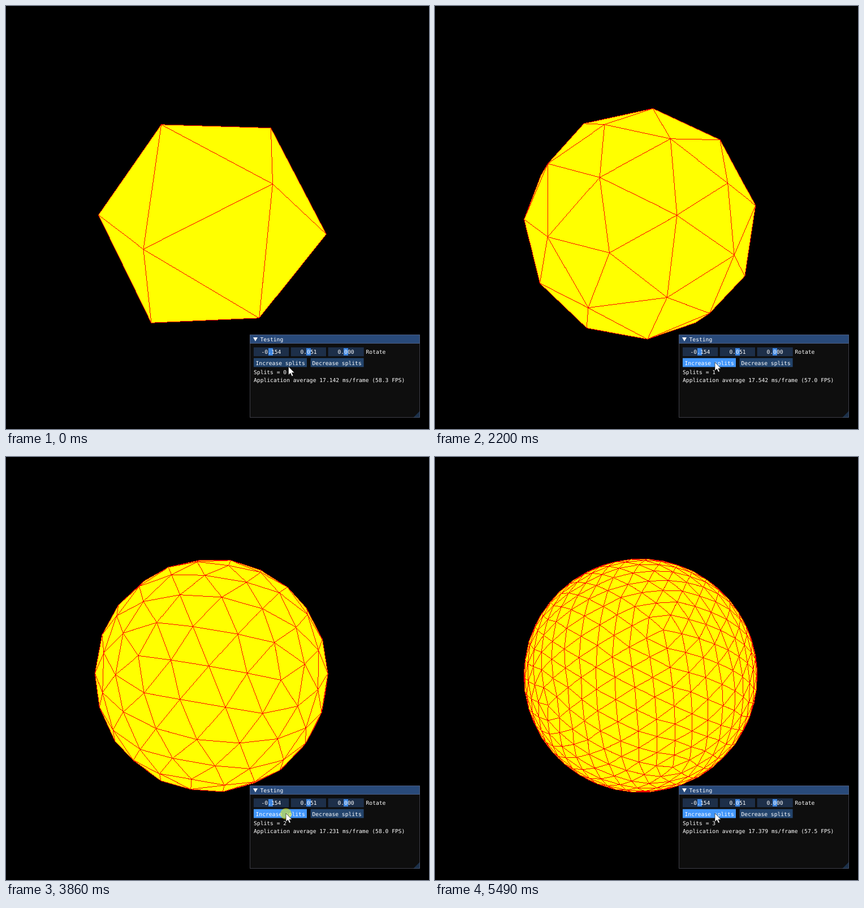
These frames come from a looping animation (748 px wide and 748 px high, 5.51 s). An HTML page with a canvas:

```html
<!DOCTYPE html>
<html lang="en">
<head>
<meta charset="utf-8">
<title>Icosphere splits</title>
<style>
  html, body { margin: 0; width: 100%; height: 100%; overflow: hidden; background: #000; }
  canvas, svg { position: absolute; left: 0; top: 0; width: 748px; height: 748px; display: block; }
  text {
    font: 9.67px "DejaVu Sans Mono", "Liberation Mono", monospace;
    fill: #fff; white-space: pre; text-rendering: geometricPrecision;
  }
  .edge { fill: none; stroke: #6e6e80; stroke-opacity: .5; }
  .frame { fill: #1d2f49; }
  .grab { fill: #3d85e0; }
  .button { fill: #23446c; }
  .button.hover { fill: #4296fa; }
  .mid { text-anchor: middle; }
</style>
</head>
<body>
<canvas id="stage" width="748" height="748"></canvas>
<svg viewBox="0 0 748 748">
  <rect x="431" y="581" width="301" height="147" fill="#0e0e0e"/>
  <rect x="431" y="581" width="301" height="16" fill="#294a7a"/>
  <path d="M732 716V728H720Z" fill="#1b304a"/>
  <path class="edge" d="M431.5 581.5H731.5V727.5H431.5ZM432 596.5H731"/>
  <path d="M437 586H445L441 593Z" fill="#fff"/>
  <text x="449.5" y="593">Testing</text>

  <rect class="frame" x="438" y="603.6" width="62.3" height="15.8"/>
  <rect class="frame" x="503.7" y="603.6" width="62.3" height="15.8"/>
  <rect class="frame" x="569.6" y="603.6" width="63.2" height="15.8"/>
  <rect class="grab" x="464" y="605" width="8" height="13"/>
  <rect class="grab" x="531" y="605" width="8" height="13"/>
  <rect class="grab" x="597" y="605" width="8" height="13"/>
  <text class="mid" x="469" y="615">-0.154</text>
  <text class="mid" x="535" y="615">0.051</text>
  <text class="mid" x="601" y="615">0.000</text>
  <text x="636.5" y="615">Rotate</text>

  <rect id="more" class="button" x="438" y="622.6" width="94" height="15.8"/>
  <rect class="button" x="538.6" y="622.6" width="94" height="15.8"/>
  <text x="441.5" y="634.5">Increase splits</text>
  <text x="541.5" y="634.5">Decrease splits</text>
  <text id="splits" x="438" y="651">Splits = 0</text>
  <text id="rate" x="438" y="665"></text>

  <circle id="click" cx="495" cy="631" r="10" fill="#ff0" fill-opacity=".5"/>
  <path id="cursor" d="M0 0V15L3.5 11.8L6 17.2L8.4 16.2L6 11H10.6Z"
        fill="#fff" stroke="#000" stroke-width=".6"/>
</svg>
<script>
const LOOP = 5510;
const CENTER_X = 363, CENTER_Y = 386, EYE = 5, FOCAL = 1011.6;
const RAD = Math.PI / 180;
const BOX = { x: 150, y: 170, size: 430 };
const RED = 0xff0000ff;

// Repaint bursts: first time, last time, number of repaints
const BURSTS = [
  [30, 570, 19], [600, 780, 8], [880, 1150, 11], [1180, 1640, 20], [1670, 1720, 2],
  [1740, 2240, 17], [2340, 2700, 16], [2720, 2870, 6], [2900, 3440, 19], [3470, 3860, 11],
  [3890, 4000, 4], [4030, 4490, 20], [4520, 4570, 2], [4590, 5130, 19], [5160, 5490, 11]
];
// Repaint count, turn in degrees, average ms per repaint
const KEYS = [
  [0, 0, 17.142], [27, 37.25, 17.282], [58, 80.25, 17.7], [93, 128.3, 17.375],
  [129, 179.4, 17.231], [153, 213.9, 17.564], [185, 256.5, 17.379]
];
const SPLIT_TIMES = [1100, 2520, 3950];

const $ = id => document.getElementById(id);
const ctx = $('stage').getContext('2d', { willReadFrequently: true });
const dot = (a, b) => a[0] * b[0] + a[1] * b[1] + a[2] * b[2];
const cross = (a, b) => [
  a[1] * b[2] - a[2] * b[1], a[2] * b[0] - a[0] * b[2], a[0] * b[1] - a[1] * b[0]
];
const mix = (a, s, b, t) => a.map((v, i) => v * s + b[i] * t);
const unit = a => a.map(v => v / Math.hypot(...a));

// Point on the unit sphere, height along the spin axis and azimuth around it
function onSphere(height, azimuth) {
  const r = Math.sqrt(1 - height * height), a = azimuth * RAD;
  return [r * Math.sin(a), height, r * Math.cos(a)];
}

function icosahedron() {
  const pole = onSphere(0.1668, 29.3), near = onSphere(-0.164, -31.6);
  const u = unit(mix(near, 1, pole, -dot(near, pole))), v = cross(pole, u);
  const half = [pole];
  for (let k = 0; k < 5; k++) {
    const a = k * 72 * RAD;
    half.push(unit(mix(pole, 0.5, mix(u, Math.cos(a), v, Math.sin(a)), 1)));
  }
  const points = half.concat(half.map(p => p.map(c => -c)));
  const linked = (i, j) => dot(points[i], points[j]) > 0.4;
  const faces = [];
  for (let a = 0; a < 12; a++)
    for (let b = a + 1; b < 12; b++)
      for (let c = b + 1; c < 12; c++)
        if (linked(a, b) && linked(b, c) && linked(a, c)) {
          const outward = dot(cross(points[a], points[b]), points[c]) > 0;
          faces.push(outward ? [a, b, c] : [a, c, b]);
        }
  return { points, faces };
}

function split(mesh) {
  const points = mesh.points.slice(), known = new Map();
  const middle = (a, b) => {
    const key = Math.min(a, b) * 1000 + Math.max(a, b);
    if (!known.has(key)) known.set(key, points.push(unit(mix(points[a], 1, points[b], 1))) - 1);
    return known.get(key);
  };
  const faces = mesh.faces.flatMap(([a, b, c]) => {
    const ab = middle(a, b), bc = middle(b, c), ca = middle(c, a);
    return [[a, ab, ca], [ab, b, bc], [ca, bc, c], [ab, bc, ca]];
  });
  return { points, faces };
}

const meshes = [icosahedron()];
for (let i = 0; i < 3; i++) meshes.push(split(meshes[i]));

// Spin about the axis, tilt the axis, then project
function projector(turn) {
  const cs = Math.cos(turn), sn = Math.sin(turn);
  const cp = Math.cos(4.02 * RAD), sp = Math.sin(4.02 * RAD);
  const cr = Math.cos(8.48 * RAD), sr = Math.sin(8.48 * RAD);
  return ([x, y, z]) => {
    const x1 = x * cs - z * sn, z1 = x * sn + z * cs;
    const y2 = y * cp + z1 * sp, z2 = z1 * cp - y * sp;
    const scale = FOCAL / (EYE - z2);
    return [CENTER_X + (x1 * cr - y2 * sr) * scale, CENTER_Y - (x1 * sr + y2 * cr) * scale];
  };
}

// Hard-edged line, one pixel wide
function plot(pixels, a, b) {
  const dx = b[0] - a[0], dy = b[1] - a[1];
  const n = Math.max(1, Math.ceil(Math.max(Math.abs(dx), Math.abs(dy))));
  for (let i = 0; i <= n; i++) {
    const x = Math.round(a[0] + dx * i / n) - BOX.x;
    const y = Math.round(a[1] + dy * i / n) - BOX.y;
    pixels[y * BOX.size + x] = RED;
  }
}

function drawMesh(mesh, turn) {
  const flat = mesh.points.map(projector(turn));
  const front = mesh.faces.filter(([i, j, k]) => {
    const a = flat[i], b = flat[j], c = flat[k];
    return (b[0] - a[0]) * (c[1] - a[1]) - (b[1] - a[1]) * (c[0] - a[0]) < 0;
  });
  ctx.fillStyle = '#000';
  ctx.fillRect(0, 0, 748, 748);
  ctx.fillStyle = '#ff0';
  ctx.beginPath();
  for (const face of front) {
    face.forEach((p, i) => ctx[i ? 'lineTo' : 'moveTo'](flat[p][0] + 0.5, flat[p][1] + 0.5));
    ctx.closePath();
  }
  ctx.fill();

  const image = ctx.getImageData(BOX.x, BOX.y, BOX.size, BOX.size);
  const pixels = new Uint32Array(image.data.buffer);
  for (const face of front)
    face.forEach((p, i) => {
      const q = face[(i + 1) % 3];
      plot(pixels, flat[Math.min(p, q)], flat[Math.max(p, q)]);
    });
  ctx.putImageData(image, BOX.x, BOX.y);
}

function repaintsAt(t) {
  let count = 0;
  for (const [from, to, n] of BURSTS) {
    if (t >= to) count += n;
    else if (t >= from) count += 1 + Math.floor((t - from) * (n - 1) / (to - from));
  }
  return count;
}

function keyed(step, column) {
  const i = Math.max(1, KEYS.findIndex(k => k[0] >= step));
  const a = KEYS[i - 1], b = KEYS[i];
  return a[column] + (b[column] - a[column]) * (step - a[0]) / (b[0] - a[0]);
}

let painted = '';
function draw(t) {
  const step = repaintsAt(t);
  const splits = SPLIT_TIMES.filter(s => t >= s).length;
  if (painted !== step + ':' + splits) {
    painted = step + ':' + splits;
    drawMesh(meshes[splits], keyed(step, 1) * RAD);
    const ms = keyed(step, 2);
    $('splits').textContent = 'Splits = ' + splits;
    $('rate').textContent =
      `Application average ${ms.toFixed(3)} ms/frame (${(1000 / ms).toFixed(1)} FPS)`;
  }
  const move = Math.min(1, Math.max(0, (t - 560) / 200));
  $('cursor').setAttribute('transform', `translate(${499.5 - 4.5 * move} ${637.5 - 7.5 * move})`);
  $('more').classList.toggle('hover', t >= 880);
  const pressed = SPLIT_TIMES.some(s => t >= s - 120 && t < s);
  $('click').setAttribute('visibility', pressed ? 'visible' : 'hidden');
}

const start = performance.now();
function tick() {
  draw((performance.now() - start) % LOOP);
  requestAnimationFrame(tick);
}
draw(0);
requestAnimationFrame(tick);
</script>
</body>
</html>
```
